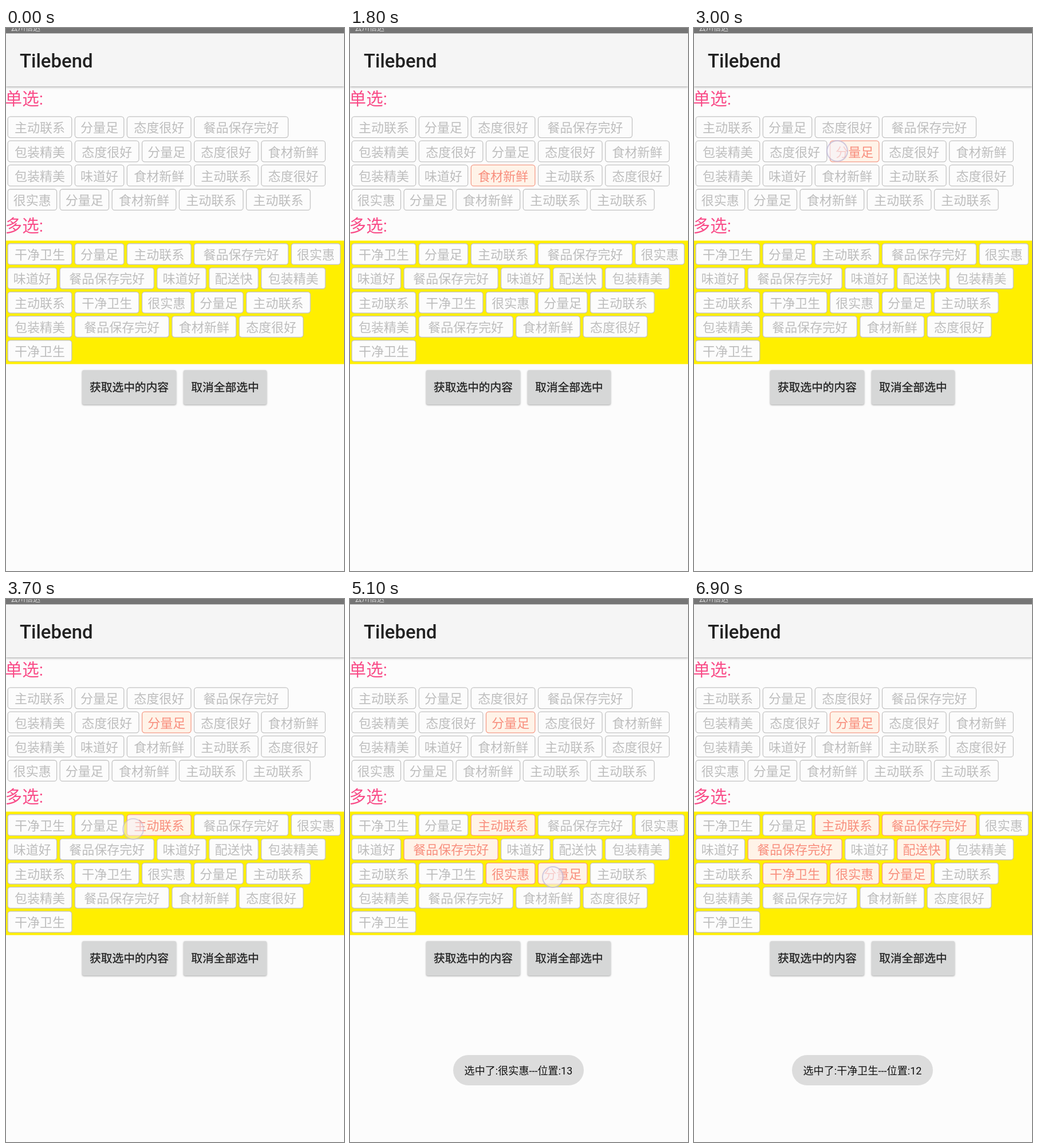
Recreate the animation shown at these times as an HTML page. Size 590x949 px, loop 8000 ms.

```html
<!DOCTYPE html>
<html lang="zh-CN">
<head>
<meta charset="utf-8">
<style>
  html, body { margin: 0; width: 100%; height: 100%; overflow: hidden; background: #fcfcfc; }
  body { position: relative; font-family: Roboto, "Noto Sans CJK SC", "Noto Sans CJK", sans-serif; }
  body > * { position: absolute; white-space: nowrap; box-sizing: border-box; }
  svg { left: 0; top: 0; width: 590px; height: 949px; }
  #bar { left: 0; top: 9px; width: 100%; height: 92.5px; background: #f5f5f5; color: #212121;
         box-shadow: 0 1px 4px rgba(0,0,0,.38); font-size: 32.9px; font-weight: 500;
         line-height: 97px; text-indent: 24px; }
  .heading { fill: #f94c88; font-size: 29.6px; }
  .tag { font-size: 22px; text-anchor: middle; }
  .tag rect { fill: #fcfcfc; stroke: #c4c4c4; stroke-width: 1.3px; }
  .tag text { fill: #bdbdbd; }
  .tag.on rect { fill: #fff3e8; stroke: #f59c88; }
  .tag.on text { fill: #f88e7d; }
  .button { top: 598px; height: 59.5px; background: #d6d7d7; border-radius: 3px; color: #212121;
            box-shadow: 0 1px 3px rgba(0,0,0,.35); font-size: 19.74px; font-weight: 500;
            line-height: 61px; text-align: center; -webkit-text-stroke: .3px; }
  .toast { left: 294px; top: 797px; height: 52.5px; padding: 0 19.5px; border-radius: 27px;
           transform: translateX(-50%); background: #dcdcdc; color: #111;
           font-size: 18.1px; line-height: 55px; }
  #touch { width: 38px; height: 38px; margin: -19px; border-radius: 50%;
           background: rgba(246,242,250,.62); border: 2.5px solid rgba(165,155,195,.5); }
</style>
</head>
<body>
<div id="bar">Tilebend</div>
<svg id="stage">
  <rect width="590" height="9.4" fill="#757575"/>
  <text x="8" y="4" font-size="13" fill="#ddd">云川信达</text>
  <text class="heading" x="-1.4" y="134.3">单选:</text>
  <text class="heading" x="-1.4" y="356.3">多选:</text>
  <rect y="371.6" width="590" height="215.8" fill="#ffef00"/>
</svg>
<div class="button" style="left:133px;width:164px">获取选中的内容</div>
<div class="button" style="left:310px;width:145px">取消全部选中</div>
<div class="toast" id="oldToast"></div>
<div class="toast" id="newToast"></div>
<div id="touch"></div>
<script>
const LOOP = 8000, STEP = 100;
const WIDTH = 590, LEFT = 2.5, GAP = 4.3, TAG_HEIGHT = 38;
const $ = id => document.getElementById(id);
const clamp = v => Math.max(0, Math.min(1, v));

function add(parent, name, attrs, text = '') {
  const el = document.createElementNS('http://www.w3.org/2000/svg', name);
  for (const key in attrs) el.setAttribute(key, attrs[key]);
  el.textContent = text;
  return parent.appendChild(el);
}

// Lays the words out left to right, wrapping at the stage edge
function buildTags(top, words) {
  let x = LEFT, y = top;
  return words.split(' ').map(word => {
    const width = 8.1 + 26.2 * word.length;
    if (x + width > WIDTH) {
      x = LEFT;
      y += TAG_HEIGHT + GAP;
    }
    const tag = add($('stage'), 'g', { class: 'tag' });
    add(tag, 'rect', { x: x + .65, y: y + .65, width: width - 1.3, height: TAG_HEIGHT - 1.3, rx: 4.5 });
    add(tag, 'text', { x: x + width / 2, y: y + 28 }, word);
    x += width + GAP;
    return tag;
  });
}

const single = buildTags(154.2, '主动联系 分量足 态度很好 餐品保存完好 ' +
  '包装精美 态度很好 分量足 态度很好 食材新鲜 包装精美 味道好 食材新鲜 主动联系 态度很好 ' +
  '很实惠 分量足 食材新鲜 主动联系 主动联系');
const multi = buildTags(376.1, '干净卫生 分量足 主动联系 餐品保存完好 很实惠 ' +
  '味道好 餐品保存完好 味道好 配送快 包装精美 主动联系 干净卫生 很实惠 分量足 主动联系 ' +
  '包装精美 餐品保存完好 食材新鲜 态度很好 干净卫生');

// Taps: time, x, y, tag position (counted from 1)
const toTaps = rows => rows.map(([time, x, y, pos]) => ({ time, x, y, pos }));
const singleTaps = toTaps([
  [700, 60, 178, 1], [1200, 178, 218, 6], [1600, 264, 275, 12], [1900, 282, 214, 7],
  [2220, 388, 233, 8], [2600, 354, 298, 18], [3000, 250, 215, 7]
]);
const multiTaps = toTaps([
  [3600, 222, 402, 3], [4050, 176, 439, 7], [4650, 281, 477, 13], [5050, 354, 486, 14],
  [5350, 398, 440, 9], [5550, 412, 385, 4], [6450, 187, 483, 12]
]);

function showToast(el, tap, opacity) {
  el.style.opacity = tap ? opacity : 0;
  if (tap) el.textContent = `选中了:${multi[tap.pos - 1].textContent}---位置:${tap.pos}`;
}

function render(now) {
  const t = Math.floor(now % LOOP / STEP) * STEP;
  const past = taps => taps.filter(tap => tap.time <= t);
  const singleDone = past(singleTaps), multiDone = past(multiTaps);
  const chosen = singleDone.at(-1), latest = multiDone.at(-1);

  single.forEach((tag, i) => tag.classList.toggle('on', chosen?.pos === i + 1));
  multi.forEach((tag, i) => tag.classList.toggle('on', multiDone.some(tap => tap.pos === i + 1)));

  const age = latest ? t - latest.time : 0;
  showToast($('oldToast'), multiDone.at(-2), clamp(1 - (age - 50) / 150));
  showToast($('newToast'), latest, clamp((age - 100) / 140));

  const tap = latest || chosen, touch = $('touch').style;
  touch.opacity = tap ? clamp(1.6 - (t - tap.time) / 120) : 0;
  if (tap) {
    touch.left = tap.x + 'px';
    touch.top = tap.y + 'px';
  }
}

const start = performance.now();
(function frame() {
  render(performance.now() - start);
  requestAnimationFrame(frame);
})();
</script>
</body>
</html>
```
